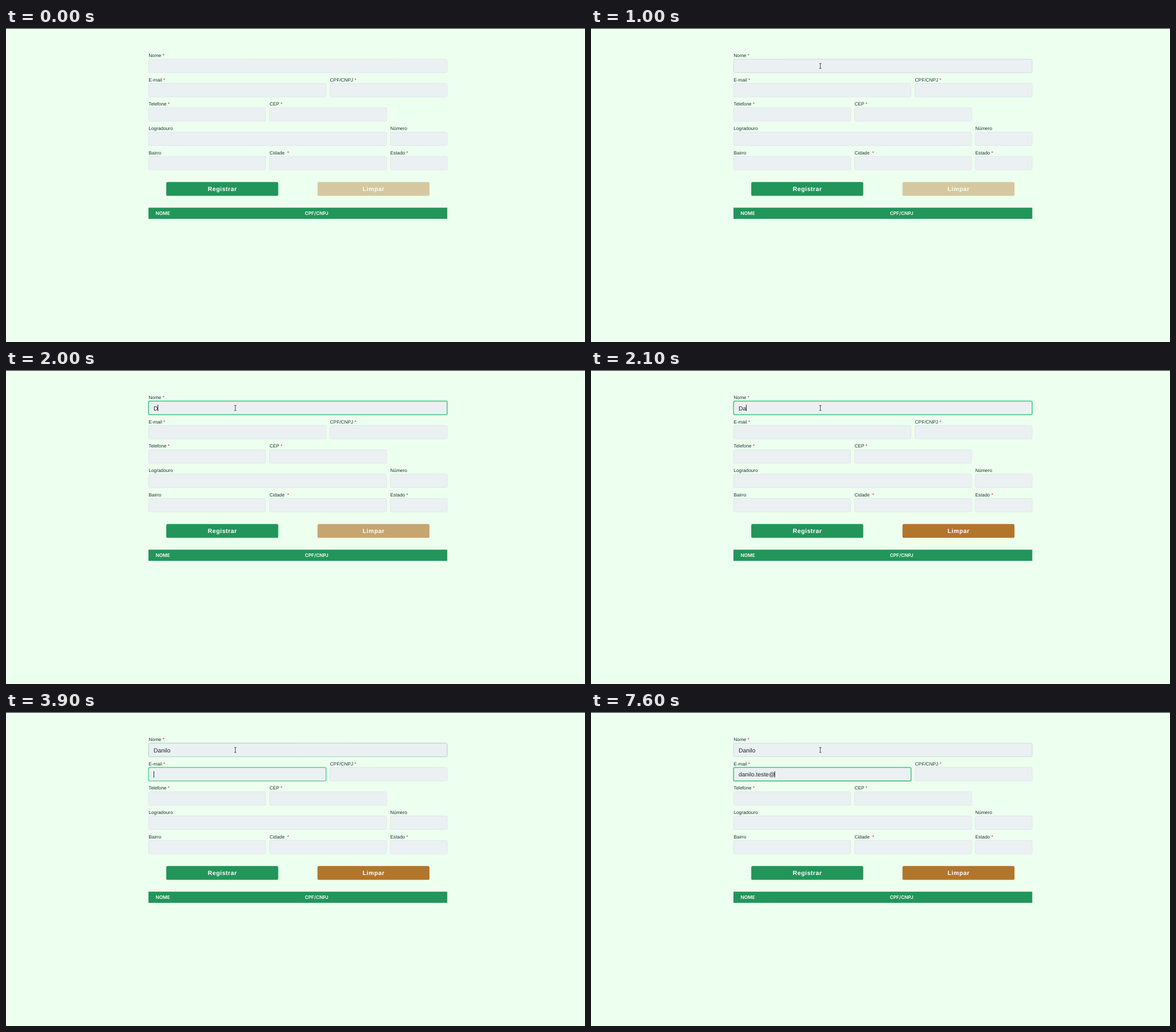
Animation, 1016 px wide and 551 px high, one loop 8000 ms. Source, as an HTML page with a canvas:

```html
<!DOCTYPE html>
<html lang="pt-BR">
<head>
<meta charset="utf-8">
<title>Cadastro</title>
<style>
  html, body { margin: 0; width: 100%; height: 100%; overflow: hidden; background: #edffee; }
  canvas { display: block; }
</style>
</head>
<body>
<canvas id="stage" width="1016" height="551"></canvas>
<script>
const ctx = document.getElementById('stage').getContext('2d');
ctx.textRendering = 'geometricPrecision';

const LOOP = 8000, STEP = 100;
const SANS = '"Liberation Sans", Arial, sans-serif';
const MENU = '"Noto Sans", sans-serif';
const BG = [237, 255, 238], WHITE = [255, 255, 255], GREEN = '#22955b';
const BORDER = [222, 229, 236], HOVER = [201, 211, 223], FOCUS = [55, 203, 130];
const ROW_TOP = 54.4, ROW_PITCH = 42.65, FIELD_HEIGHT = 24.2;

// label, row, left, width
const fields = [
  ['Nome *', 0, 250, 524.3],
  ['E-mail *', 1, 250, 311.8],
  ['CPF/CNPJ *', 1, 568.3, 206],
  ['Telefone *', 2, 250, 205.8],
  ['CEP *', 2, 462.2, 206],
  ['Logradouro', 3, 250, 418.2],
  ['Número', 3, 674, 100.3],
  ['Bairro', 4, 250, 205.8],
  ['Cidade  *', 4, 462.2, 206],
  ['Estado *', 4, 674, 100.3]
];

const suggestions = [
  ['CELSO LEONARDO VEIGA DOS MONTES', '00123-456'],
  ['Celso Montes', 'celsoleo.veiga@example.com'],
  ['Celso', '(00) 95550-1234']
];

// [time, value] keys; values hold until the next key
const nameKeys = [[0, ''], [2000, 'D'], [2100, 'Da'], [2300, 'Dan'], [2400, 'Dani'], [2700, 'Danilo']];
const emailKeys = [[0, ''], [4800, 'd'], [5000, 'da'], [5100, 'dan'], [5200, 'dani'],
  [5400, 'danil'], [5500, 'danilo'], [6000, 'danilo.'], [6300, 'danilo.t'], [6400, 'danilo.te'],
  [6600, 'danilo.tes'], [6700, 'danilo.teste'], [7600, 'danilo.teste@']];
const caretKeys = [[0, 0], [1100, 1], [1600, 0], [2000, 1], [3300, 0], [3800, 1],
  [4400, 0], [4800, 1], [7300, 0], [7600, 1]];
const nameFocusKeys = [[0, 0], [1100, 0.5], [1200, 0.9], [1300, 1], [3800, 0.75], [3900, 0.2], [4000, 0]];
const emailFocusKeys = [[0, 0], [3800, 0.3], [3900, 0.85], [4000, 1]];
const hoverKeys = [[0, 0], [800, 0.4], [900, 0.85], [1000, 1]];
const clearKeys = [[0, 0.4], [2000, 0.65], [2100, 1]];
const beamKeys = [[800, 64], [900, 66], [1000, 66.6]];

const at = (keys, t) => keys.reduce((value, key) => t >= key[0] ? key[1] : value, keys[0][1]);
const mix = (a, b, k) => a.map((v, i) => v + (b[i] - v) * k);
const rgb = c => `rgb(${c.map(Math.round).join(',')})`;

function text(str, x, y, font, color, spacing = 0) {
  ctx.font = font;
  ctx.letterSpacing = spacing + 'px';
  ctx.fillStyle = color;
  ctx.fillText(str, x, y);
  return ctx.measureText(str).width;
}

function roundRect(x, y, w, h, r) {
  ctx.beginPath();
  ctx.roundRect(x, y, w, h, r);
}

function drawField([label, row, x, w], focus, hover) {
  const y = ROW_TOP + row * ROW_PITCH;
  const font = '8.3px ' + SANS;
  const plain = label.replace('*', '');
  const width = text(plain, x + 0.3, y - 3.4, font, '#22303d');
  if (plain !== label) text('*', x + 0.3 + width, y - 3.4, font, '#d8202c');

  roundRect(x, y, w, FIELD_HEIGHT, 2.6);
  ctx.fillStyle = '#ebf0f3';
  ctx.fill();
  if (focus) {
    ctx.strokeStyle = `rgba(55,203,130,${0.3 * focus})`;
    ctx.lineWidth = 2.2;
    ctx.stroke();
  }
  roundRect(x + 0.25, y + 0.25, w - 0.5, FIELD_HEIGHT - 0.5, 2.4);
  ctx.strokeStyle = rgb(mix(mix(BORDER, HOVER, hover), FOCUS, focus));
  ctx.lineWidth = 0.8 + 0.5 * focus;
  ctx.stroke();
}

function drawValue(value, row, caret) {
  const middle = ROW_TOP + row * ROW_PITCH + FIELD_HEIGHT / 2;
  const width = text(value, 259, middle + 4, '10.4px ' + SANS, '#202428');
  if (!caret) return;
  ctx.fillStyle = '#202428';
  ctx.fillRect(Math.floor(259 + width), Math.round(middle - 5.6), 1, 11);
}

function drawButton(label, x, color, alpha) {
  roundRect(x, 270.3, 196.5, 24.3, 2.6);
  ctx.fillStyle = rgb(mix(BG, color, alpha));
  ctx.fill();
  ctx.textAlign = 'center';
  text(label, x + 98.5, 286, 'bold 10.6px ' + SANS, rgb(mix(BG, WHITE, alpha)), 0.53);
  ctx.textAlign = 'left';
}

function drawTableHead() {
  ctx.fillStyle = GREEN;
  ctx.fillRect(250, 315.3, 524.3, 19.6);
  const font = '600 8.3px Inter, sans-serif';
  text('NOME', 262.4, 328, font, '#fff');
  text('CPF/CNPJ', 524.4, 328, font, '#fff');
}

function drawMenu() {
  ctx.save();
  ctx.shadowColor = 'rgba(0,0,0,0.25)';
  ctx.shadowBlur = 3;
  ctx.shadowOffsetY = 1;
  roundRect(250, 80, 215, 147.5, 1.5);
  ctx.fillStyle = '#131721';
  ctx.fill();
  ctx.restore();
  suggestions.forEach(([title, detail], i) => {
    text(title, 257.8, 99.8 + i * 37, '500 10px ' + MENU, '#b9bfc8');
    text(detail, 257.8, 114.6 + i * 37, '9.2px ' + MENU, '#c3c8d0');
  });
  text('Gerenciar endereços…', 257.8, 218.6, '9.85px ' + MENU, '#c3c8d0');
}

function outlined(color, width, halo) {
  ctx.strokeStyle = halo;
  ctx.lineWidth = width + 1.2;
  ctx.stroke();
  ctx.strokeStyle = color;
  ctx.lineWidth = width;
  ctx.stroke();
}

function drawArrow(x, y) {
  ctx.beginPath();
  [[0, 0], [0, 8.6], [2, 6.9], [3.4, 10], [4.8, 9.3], [3.5, 6.4], [6, 6.2]]
    .forEach(([dx, dy]) => ctx.lineTo(x + dx, y + dy));
  ctx.closePath();
  outlined('#fff', 0.6, '#fff');
  ctx.fillStyle = '#111';
  ctx.fill();
}

function drawBeam(x, y) {
  ctx.beginPath();
  for (const end of [-4.3, 4.3]) {
    ctx.moveTo(x - 1.9, y + end);
    ctx.lineTo(x + 1.9, y + end);
  }
  ctx.moveTo(x, y - 4.3);
  ctx.lineTo(x, y + 4.3);
  outlined('#2b2d30', 0.9, 'rgba(255,255,255,0.75)');
}

function draw(t) {
  ctx.fillStyle = rgb(BG);
  ctx.fillRect(0, 0, 1016, 551);
  ctx.fillStyle = '#2b2d38';
  ctx.fillRect(0, 0, 1016, 1.2);

  const focus = [at(nameFocusKeys, t), at(emailFocusKeys, t)];
  fields.forEach((field, i) => drawField(field, focus[i] || 0, i ? 0 : at(hoverKeys, t)));
  const caret = at(caretKeys, t), onEmail = t >= 3800;
  drawValue(at(nameKeys, t), 0, caret && !onEmail);
  drawValue(at(emailKeys, t), 1, caret && onEmail);

  drawButton('Registrar', 281.2, [34, 149, 91], 1);
  drawButton('Limpar', 546.6, [178, 117, 43], at(clearKeys, t));
  drawTableHead();

  if (t >= 1200 && t < 2000) drawMenu();
  if (t >= 800) drawBeam(402.4, at(beamKeys, t));
  else if (t >= 500) drawArrow(389.6, 31.4);
}

const start = performance.now();
function frame() {
  const t = (performance.now() - start) % LOOP;
  draw(Math.floor(t / STEP) * STEP);
  requestAnimationFrame(frame);
}
frame();
</script>
</body>
</html>
```
